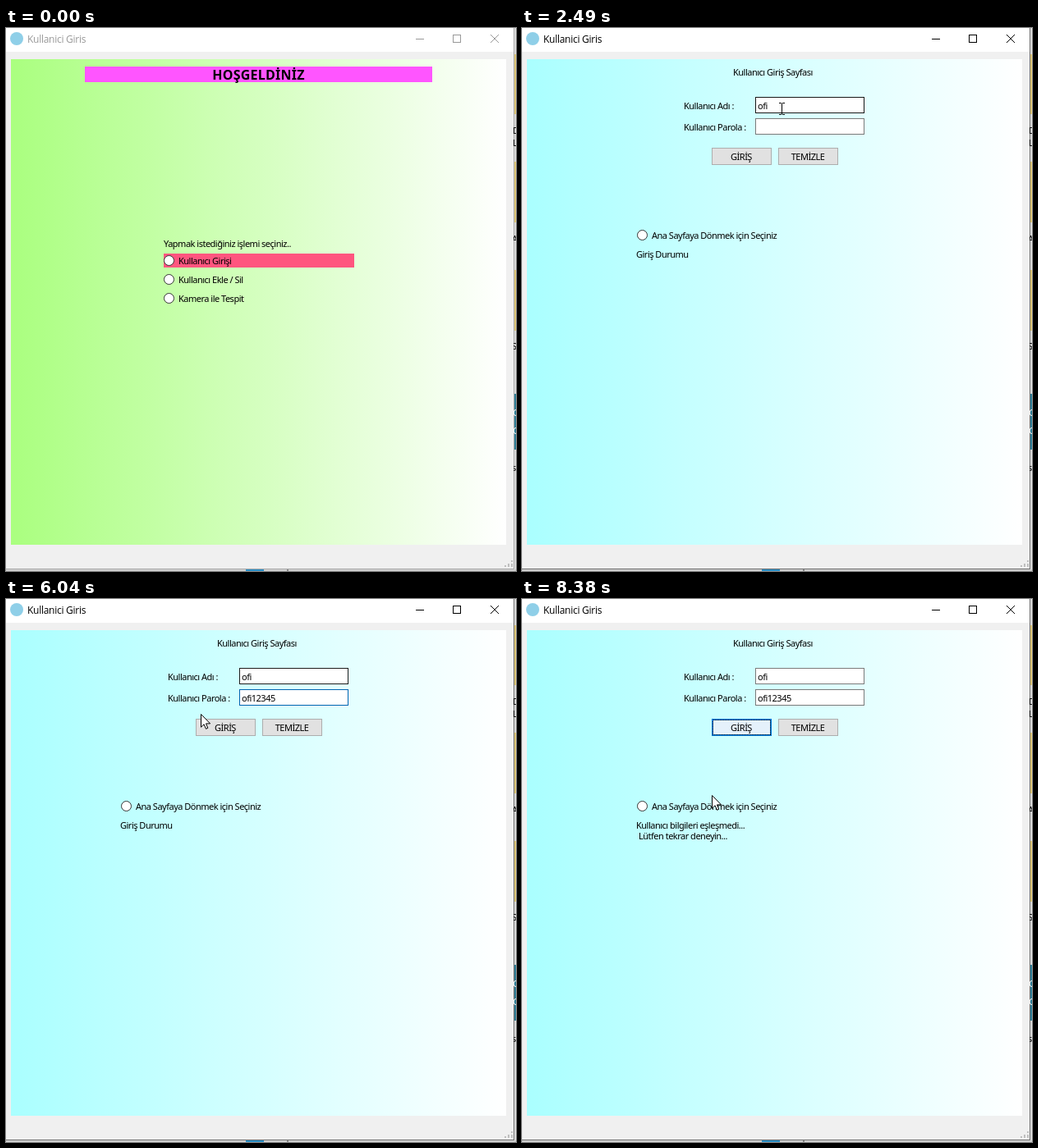
Recreate the animation shown at these times as an HTML page. Size 621x662 px, loop 8.45 s.

```html
<!DOCTYPE html>
<html lang="tr">
<head>
<meta charset="utf-8">
<title>Kullanici Giris</title>
<style>
  html, body { margin: 0; width: 100%; height: 100%; overflow: hidden; background: #f0f0f0; }
  svg { display: block; width: 621px; height: 662px; }
  text { font: 11px "Noto Sans", "DejaVu Sans", sans-serif; letter-spacing: -.5px; white-space: pre; }
  .title { font: 12px "Open Sans", "Noto Sans", sans-serif; letter-spacing: -.27px; fill: var(--ink); }
  .heading { font-weight: 700; font-size: 16px; letter-spacing: .25px; }
  .mid { text-anchor: middle; }
  .crisp { shape-rendering: crispEdges; }
  .radio { fill: #fff; stroke: #333; }
  .field { fill: #fff; stroke: #7a7a7a; }
  .button { fill: #e1e1e1; stroke: #adadad; }
  .controls { fill: none; stroke: var(--ink); }
  #app { --ink: #000; --edge: #707070; }
  #app.inactive { --ink: #999; --edge: #aaa; }
</style>
</head>
<body>
<svg id="app" viewBox="0 0 621 662">
  <defs>
    <linearGradient id="green"><stop stop-color="#aaff7f"/><stop offset="1" stop-color="#fff"/></linearGradient>
    <linearGradient id="cyan"><stop stop-color="#aaffff"/><stop offset="1" stop-color="#fff"/></linearGradient>
    <clipPath id="strip"><path d="M618 0h3v662h-3z"/></clipPath>
  </defs>

  <!-- desktop behind the window -->
  <g class="crisp">
    <path fill="#dcdcdc" d="M0 0h621v662H0z"/>
    <path fill="#e0c878" d="M619 32h2v73h-2zM619 163h2v74h-2zM619 295h2v74h-2z"/>
    <path fill="#2f7f98" d="M619 446h2v68h-2z"/>
    <path fill="#d0d0d0" d="M0 660h621v2H0z"/>
    <path fill="#2b90c8" d="M292 660h22v2h-22z"/>
    <path fill="#888" d="M342 660h2v2h-2z"/>
  </g>

  <!-- window frame -->
  <g class="crisp">
    <path fill="#f0f0f0" d="M0 0h618v659H0z"/>
    <path fill="#fff" d="M0 0h618v29H0z"/>
    <path fill="none" stroke="var(--edge)" d="M618.5 0V659.5H0"/>
    <path fill="#bfbfbf" d="M615 649h2v2h-2zM611 653h2v2h-2zM615 653h2v2h-2zM607 657h2v-2h-2zM611 657h2v-2h-2zM615 657h2v-2h-2z"/>
  </g>
  <g clip-path="url(#strip)">
    <text x="617" y="129">D</text><text x="617" y="144">L</text>
    <text x="616" y="261">A</text><text x="616" y="392">S</text>
    <text x="617" y="473" fill="#fff">C</text><text x="617" y="495" fill="#fff">C</text>
    <text x="616" y="540">s</text>
  </g>
  <circle cx="13" cy="13" r="8" fill="#8fcfe8"/>
  <text class="title" x="26" y="18">Kullanici Giris</text>
  <g class="controls">
    <path class="crisp" d="M499 13.5h10M544.5 8.5h9v9h-9z"/>
    <path d="M590 8l10 10M600 8l-10 10"/>
  </g>

  <g id="welcome">
    <path class="crisp" fill="url(#green)" d="M6 38h603v592H6z"/>
    <path class="crisp" fill="#ff55ff" d="M96 47h423v19H96z"/>
    <text class="heading mid" x="307.5" y="63">HOŞGELDİNİZ</text>
    <text x="192" y="267">Yapmak istediğiniz işlemi seçiniz..</text>
    <path class="crisp" fill="#ff557f" d="M192 275h232v17H192z"/>
    <circle id="choice" class="radio" cx="198.5" cy="283.5" r="6"/>
    <circle class="radio" cx="198.5" cy="306.5" r="6"/>
    <circle class="radio" cx="198.5" cy="329.5" r="6"/>
    <text x="210" y="288">Kullanıcı Girişi</text>
    <text x="210" y="311">Kullanıcı Ekle / Sil</text>
    <text x="210" y="334">Kamera ile Tespit</text>
  </g>

  <g id="login">
    <path class="crisp" fill="url(#cyan)" d="M6 38h603v592H6z"/>
    <text x="257" y="58">Kullanıcı Giriş Sayfası</text>
    <text x="197" y="99">Kullanıcı Adı :</text>
    <text x="197" y="125">Kullanıcı Parola :</text>
    <g class="crisp">
      <rect id="userBox" class="field" x="284.5" y="84.5" width="132" height="19"/>
      <rect id="passBox" class="field" x="284.5" y="110.5" width="132" height="19"/>
      <rect id="enter" class="button" x="231.5" y="146.5" width="72" height="20"/>
      <g id="focus" fill="none">
        <rect x="232.5" y="147.5" width="70" height="18" stroke="#0078d7"/>
        <rect x="232.5" y="147.5" width="70" height="18" stroke="#222" stroke-dasharray="1 1"/>
      </g>
      <rect class="button" x="312.5" y="146.5" width="72" height="20"/>
    </g>
    <text id="userText" x="287" y="99"></text>
    <text id="passText" x="287" y="125"></text>
    <rect id="caret" class="crisp" width="1" height="13"/>
    <text class="mid" x="267" y="161">GİRİŞ</text>
    <text class="mid" x="348" y="161">TEMİZLE</text>
    <circle class="radio" cx="146.5" cy="252.5" r="6"/>
    <text x="158" y="257">Ana Sayfaya Dönmek için Seçiniz</text>
    <text id="status" x="139" y="280"></text>
    <text id="status2" x="142" y="293"></text>
  </g>

  <g id="pointer">
    <circle id="halo" r="13" fill="#ffe000" fill-opacity=".65"/>
    <path id="arrow" fill="#fff" stroke="#000" stroke-linejoin="miter"
      d="M.5 .5V16.2L4.1 12.8 6.5 18.3 8.8 17.3 6.5 11.9H11.6Z"/>
    <path id="beam" class="crisp" fill="none" stroke="#000" d="M-3 -6.5h3M1 -6.5h3M.5 -6V7M-3 7.5h3M1 7.5h3"/>
  </g>
</svg>
<script>
const LOOP = 8450, TICK = LOOP / 126;
const USER = "ofi", PASS = USER + "12345";
const BLUE = "#0078d7", GREY = "#7a7a7a", DARK = "#171717";
const $ = id => document.getElementById(id);

// Each track is a list of [start, value]; values hold until the next start.
const userLength = [[0, 0], [1270, 1], [1560, 2], [1830, 3]];
const passLength = [[0, 0], [3820, 1], [4030, 2], [4280, 3], [4750, 4], [4890, 5], [5000, 7], [5100, 8]];
const caretField = [[0, ""], [600, "user"], [1070, ""], [1270, "user"], [2490, ""], [2560, "pass"],
  [3160, ""], [3690, "pass"], [4420, ""], [4620, "pass"], [5760, ""], [6290, "pass"], [6820, ""]];
const passBorder = [[0, GREY], [2560, BLUE], [5830, DARK], [5960, "#0063b1"], [6180, BLUE], [7340, GREY]];
const enterLook = [[0, ["#e1e1e1", "#adadad"]], [6380, ["#e3e9ee", "#5793c2"]], [6450, ["#e5f1fb", BLUE]],
  [7340, ["#cce4f7", "#005499"]], [7540, ["#e5f1fb", BLUE]]];
const path = [[70, 300, 664], [400, 226, 290], [540, 226, 290], [600, 225, 289], [960, 225, 289],
  [1006, 165, 190], [1073, 316, 98], [5701, 316, 98], [6034, 237, 140], [6170, 237, 140], [6900, 250, 150],
  [7000, 254, 151], [7240, 254, 153], [7540, 260, 153], [7700, 268, 152], [8300, 268, 152], [8380, 231, 239]];

const at = (track, t) => track.findLast(([start]) => start <= t)[1];
const between = (t, a, b) => t >= a && t < b;
const show = (id, on) => $(id).style.display = on ? "" : "none";
const paint = (id, fill, stroke) => Object.assign($(id).style, { fill, stroke });

function pointerAt(t) {
  const next = path.findIndex(([time]) => time > t);
  if (next < 0) return path.at(-1).slice(1);
  if (next === 0) return path[0].slice(1);
  const [t0, x0, y0] = path[next - 1], [t1, x1, y1] = path[next];
  const k = (t - t0) / (t1 - t0);
  return [Math.round(x0 + (x1 - x0) * k), Math.round(y0 + (y1 - y0) * k)];
}

function userBorder(t) {
  if (t < 1070) return BLUE;
  const fade = Math.min(1, Math.max(0, (t - 6000) / 900));
  const level = Math.round(23 + 99 * fade);
  return `rgb(${level},${level},${level})`;
}

function drawPointer(t) {
  const sampled = Math.floor((t + 8) / TICK) * TICK;
  const [x, y] = pointerAt(sampled);
  const beam = between(t, 1070, 5960);
  $("pointer").setAttribute("transform", `translate(${x} ${y})`);
  show("pointer", t >= 70);
  show("beam", beam);
  show("arrow", !beam);
  show("halo", between(t, 400, 600) || between(t, 7340, 7540));
}

function drawForm(t) {
  $("userText").textContent = USER.slice(0, at(userLength, t));
  $("passText").textContent = PASS.slice(0, at(passLength, t));
  const field = at(caretField, t);
  show("caret", field);
  if (field) {
    $("caret").setAttribute("x", Math.round(287 + $(field + "Text").getComputedTextLength()));
    $("caret").setAttribute("y", field === "user" ? 88 : 114);
  }
  paint("userBox", "#fff", userBorder(t));
  paint("passBox", "#fff", at(passBorder, t));
  paint("enter", ...at(enterLook, t));
  show("focus", t >= 7340);
  const failed = t >= 7540;
  $("status").textContent = failed ? "Kullanıcı bilgileri eşleşmedi..." : "Giriş Durumu";
  $("status2").textContent = failed ? "Lütfen tekrar deneyin..." : "";
}

function draw() {
  const t = performance.now() % LOOP;
  const loggingIn = t >= 600;
  $("app").classList.toggle("inactive", t < 400);
  show("welcome", !loggingIn);
  show("login", loggingIn);
  paint("choice", "#fff", t >= 330 ? BLUE : "#333");
  if (loggingIn) drawForm(t);
  drawPointer(t);
  requestAnimationFrame(draw);
}
draw();
</script>
</body>
</html>
```
